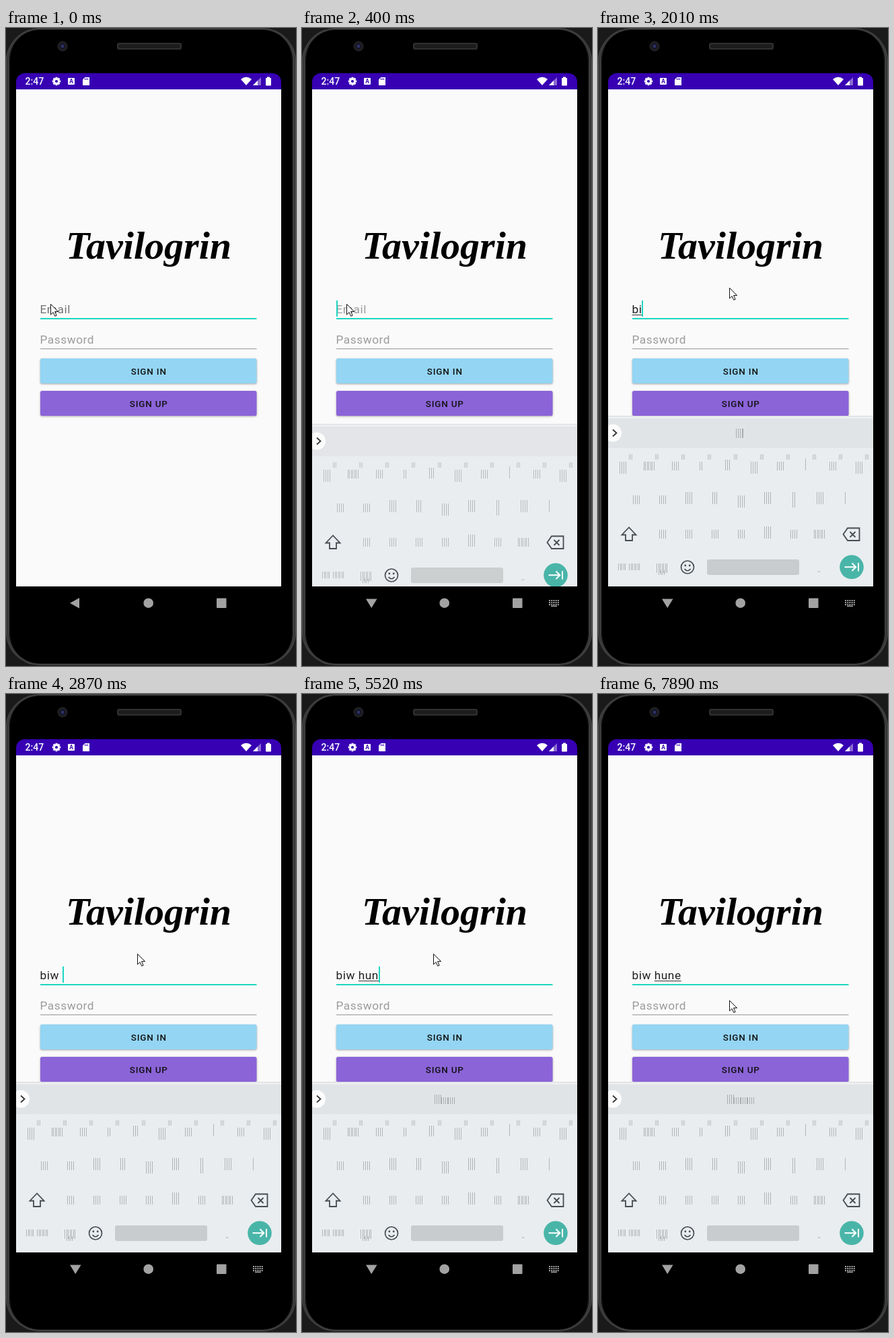
An HTML page with a canvas that plays this animation: 431 px wide and 946 px high, repeating every 8000 ms.

```html
<!DOCTYPE html>
<html lang="en">
<head>
<meta charset="utf-8">
<title>Sign in</title>
<style>
html, body { margin: 0; width: 100%; height: 100%; overflow: hidden; background: #000; }
canvas { display: block; }
</style>
</head>
<body>
<canvas id="stage" width="431" height="946"></canvas>
<script>
const ctx = document.getElementById('stage').getContext('2d');
const LOOP = 8000;
const TEAL = '#1fd6c1';

// Each track holds [start in ms, value]; a value stays until the next one.
const pointerTrack = [
  [0, [66, 409]], [550, [112, 417]], [700, [156, 409]], [850, [195, 385]],
  [6640, [242, 417]], [6790, [266, 480]], [6910, [272, 505]], [7060, [271, 503]],
  [7190, [264, 490]], [7310, [252, 475]], [7470, [224, 466]], [7610, [206, 460]],
  [7740, [197, 456]], [7890, [195, 454]]
];
const caretTrack = [
  [0, false], [120, true], [700, false], [1130, true], [1630, false], [1890, true],
  [3310, false], [3870, true], [4270, false], [4700, true], [6640, false],
  [7060, true], [7610, false]
];
const textTrack = [
  [0, ''], [1890, 'b'], [2010, 'bi'], [2410, 'biw'], [2870, 'biw '], [4700, 'biw h'],
  [5240, 'biw hu'], [5520, 'biw hun'], [6110, 'biw hune']
];
const keyboardTrack = [
  [0, null], [270, { dy: 78, fade: 0.5 }], [400, { dy: 12, fade: 0.9 }], [550, { dy: 0, fade: 1 }]
];

const at = (track, t) => track.reduce((value, [start, next]) => (t >= start ? next : value), track[0][1]);

function rect(x, y, w, h, color) {
  ctx.fillStyle = color;
  ctx.fillRect(x, y, w, h);
}

function round(x, y, w, h, r, color) {
  ctx.beginPath();
  ctx.roundRect(x, y, w, h, r);
  ctx.fillStyle = color;
  ctx.fill();
}

function disc(x, y, r, color) {
  ctx.beginPath();
  ctx.arc(x, y, r, 0, Math.PI * 2);
  ctx.fillStyle = color;
  ctx.fill();
}

function shape(path, fill, stroke, width = 1) {
  const p = new Path2D(path);
  if (fill) { ctx.fillStyle = fill; ctx.fill(p); }
  if (stroke) { ctx.strokeStyle = stroke; ctx.lineWidth = width; ctx.stroke(p); }
}

function text(str, x, y, font, color, spacing = 0, align = 'left') {
  ctx.font = font;
  ctx.letterSpacing = spacing + 'px';
  ctx.textAlign = align;
  ctx.fillStyle = color;
  ctx.fillText(str, x, y);
  return ctx.measureText(str).width;
}

const fieldText = (str, x, y, color) => text(str, x, y, '17.25px Roboto, sans-serif', color, 0.54);

function drawPhone() {
  rect(0, 0, 431, 946, '#1a1a1b');
  const rings = [[0, '#4b4b4d'], [1.5, '#2b2b2d'], [3, '#58585a'], [4, '#1c1c1d'], [6, '#000']];
  for (const [inset, color] of rings) {
    round(inset, inset / 2, 431 - 2 * inset, 945 - inset, 50 - inset, color);
  }
  round(165, 22, 96, 10, 3, '#303031');
  round(167, 24, 92, 6, 2, '#1d1d1e');
  disc(84, 27, 7.5, '#222225');
  disc(84, 27, 5, '#15161f');
  disc(84, 27, 2.5, '#2b3068');
}

function drawStatusBar() {
  round(15, 67, 394, 24, [13, 13, 0, 0], '#3700b3');
  text('2:47', 28.5, 84, '500 14px Roboto, sans-serif', '#fff');

  ctx.save();
  ctx.translate(75, 79);
  for (let i = 0; i < 4; i++) {
    rect(-1.5, -6.2, 3, 12.4, '#fff');
    ctx.rotate(Math.PI / 4);
  }
  ctx.restore();
  disc(75, 79, 4.7, '#fff');
  disc(75, 79, 2.1, '#3700b3');

  round(92, 74, 10, 10, 1, '#fff');
  text('A', 97, 82.3, '700 8.5px Roboto, sans-serif', '#3700b3', 0, 'center');
  shape('M117.5 73H124V85H114V76.5Z', '#fff');
  for (let x = 117; x < 123; x += 2) rect(x, 74.5, 1, 2.5, '#3700b3');

  shape('M349 76Q357 69.5 365 76L357 85Z', '#fff');
  shape('M379 73V85H367Z', '#8a68d2');
  shape('M374 78V85H367Z', '#fff');
  round(386, 74, 8, 11.5, 1, '#fff');
  rect(388, 72.5, 4, 2, '#fff');
}

function drawButton(label, x, y, color) {
  ctx.save();
  ctx.shadowColor = 'rgba(0,0,0,.35)';
  ctx.shadowBlur = 3;
  ctx.shadowOffsetY = 1;
  round(51, y, 321.5, 37, 2.5, color);
  ctx.restore();
  text(label, x, y + 24, '500 13.4px Roboto, sans-serif', '#111', 0.85);
}

function drawForm(typed, caretOn, hintColor) {
  rect(15, 91, 394, 737, '#fafafa');
  text('Tavilogrin', 212, 342, 'italic 700 58px "Liberation Serif", serif', '#000', 0, 'center');

  let width = 0;
  if (typed) {
    width = fieldText(typed, 50.5, 423, '#202020');
    const wordStart = typed.lastIndexOf(' ') + 1;
    const before = ctx.measureText(typed.slice(0, wordStart)).width;
    if (wordStart < typed.length) rect(50.5 + before, 425, width - before, 1, '#333');
  } else {
    fieldText('Email', 50.5, 423, hintColor);
  }
  rect(51, 430, 321.5, 2, TEAL);
  if (caretOn) rect(Math.round(50.5 + width), 404, 2, 24, TEAL);

  fieldText('Password', 50.5, 468, '#9b9b9b');
  rect(51, 475, 321.5, 1.3, '#a9a9a9');
  drawButton('SIGN IN', 185.7, 490, '#93d5f3');
  drawButton('SIGN UP', 183.7, 538, '#8b64d8');
}

const barWidths = { i: 2, l: 2, j: 3, r: 5, t: 7, f: 7, w: 15, m: 17 };
const barWidth = letter => barWidths[letter] || 9;

function bars(x, y, w, h, color, pitch = 3) {
  for (let dx = 0; dx <= w; dx += pitch) rect(Math.round(x + dx), y, 1, h, color);
}

// A letter shown as vertical bars that keep its width, ascender and descender.
function barLetter(letter, x, base, xHeight, reach, color) {
  const up = 'bdfhijkl'.includes(letter) ? reach : letter === 't' ? reach - 2 : 0;
  const down = 'gjpqy'.includes(letter) ? reach : 0;
  const w = barWidth(letter);
  bars(x, base - xHeight - up, w, xHeight + up + down, color, w > 10 ? 2.5 : 3);
}

function drawSuggestion(word) {
  const total = [...word].reduce((sum, c) => sum + barWidth(c) + 1, -1);
  let x = 211 - total / 2;
  for (const c of word) {
    barLetter(c, x, 608, 10, 4, '#a9acaf');
    x += barWidth(c) + 1;
  }
}

function drawKeyIcons() {
  const ink = '#474c51';
  disc(22, 600.5, 13, '#fcfcfc');
  shape('M22 595.5L27.5 600.5L22 605.5', null, '#333', 1.8);
  shape('M46 740.5L35.5 751.5H41V760H51V751.5H56.5Z', null, ink, 1.8);
  shape('M371 741.5H388.5V760H371L364.5 750.7Z', null, ink, 1.8);
  shape('M374.5 747L382.5 755M382.5 747L374.5 755', null, ink, 1.8);
  shape('M142.5 799.5A9.5 9.5 0 1 1 123.5 799.5A9.5 9.5 0 1 1 142.5 799.5M128.5 802Q133 807.5 137.5 802', null, ink, 1.7);
  disc(129.8, 797, 1.4, ink);
  disc(136.2, 797, 1.4, ink);
  disc(377, 799.3, 17.8, '#49b5a8');
  shape('M366.5 799.3H383M377.5 793.5L383.3 799.3L377.5 805M387 793V805.5', null, '#fff', 2);
}

function drawKeyboard({ dy, fade }, word) {
  const ink = '#b1b5b8';
  ctx.save();
  ctx.beginPath();
  ctx.rect(15, 91, 394, dy > 50 ? 786 : 737);
  ctx.clip();
  if (dy > 50) rect(15, 828, 394, 49, '#fafafa');
  ctx.translate(0, dy);
  ctx.globalAlpha = fade;
  rect(15, 575, 394, 1, '#d9dbdd');
  rect(15, 576, 394, 3, '#eceeef');
  rect(15, 579, 394, 44, '#e1e4e7');
  rect(15, 623, 394, 205, '#e9edf0');

  const rows = [['qwertyuiop', 36, 656], ['asdfghjkl', 56, 706], ['zxcvbnm', 95, 757]];
  for (const [letters, left, base] of rows) {
    [...letters].forEach((c, i) => {
      const center = left + 39 * i;
      barLetter(c, center - barWidth(c) / 2, base, 13, 5, ink);
      if (base === 656) bars(center + 10, 632, 4, 8, '#bfc3c6', 2);
    });
  }
  bars(30, 794, 12, 10, ink, 2.5);
  bars(46, 794, 15, 10, ink, 2.5);
  bars(87, 794, 15, 14, ink, 2.5);
  bars(90, 804, 9, 7, ink, 2.5);
  bars(327, 805, 2, 2, ink, 2);
  round(162, 788, 137, 23, 3, '#c8ccce');
  drawSuggestion(word);

  ctx.globalAlpha = Math.min(1, fade + 0.3);
  drawKeyIcons();
  ctx.restore();
  if (dy > 50) rect(15, 828, 394, 49, 'rgba(0,0,0,.53)');
}

function drawNavigation(keyboard) {
  const color = keyboard && keyboard.dy > 50 ? '#cfcfcf' : '#a2a2a2';
  shape(keyboard ? 'M95 846.5H111.5L103.2 860Z' : 'M109 845V860.5L95 852.7Z', color);
  disc(211.7, 852.7, 7.3, color);
  round(313, 845.5, 14.5, 14.5, 1, color);
  if (!keyboard) return;
  for (let y = 0; y < 3; y++) {
    for (let x = 0; x < 5; x++) rect(367 + x * 3.2, 848 + y * 3, 2, 2, color);
  }
  rect(370, 856.5, 9, 1.5, color);
}

function drawPointer([x, y]) {
  ctx.save();
  ctx.translate(x + 0.5, y + 0.5);
  ctx.lineJoin = 'miter';
  shape('M0 0V15.5L3.6 12L6.2 17.8L8.6 16.8L6.1 11H11Z', '#fff', '#111', 1);
  ctx.restore();
}

function draw(t) {
  const typed = at(textTrack, t);
  const keyboard = at(keyboardTrack, t);
  drawPhone();
  drawStatusBar();
  drawForm(typed, at(caretTrack, t), keyboard ? '#9b9b9b' : '#737373');
  rect(15, 828, 394, 49, '#000');
  if (keyboard) drawKeyboard(keyboard, typed.split(' ').pop());
  drawNavigation(keyboard);
  drawPointer(at(pointerTrack, t));
}

const start = performance.now();
function frame() {
  draw((performance.now() - start) % LOOP);
  requestAnimationFrame(frame);
}
frame();
</script>
</body>
</html>
```
